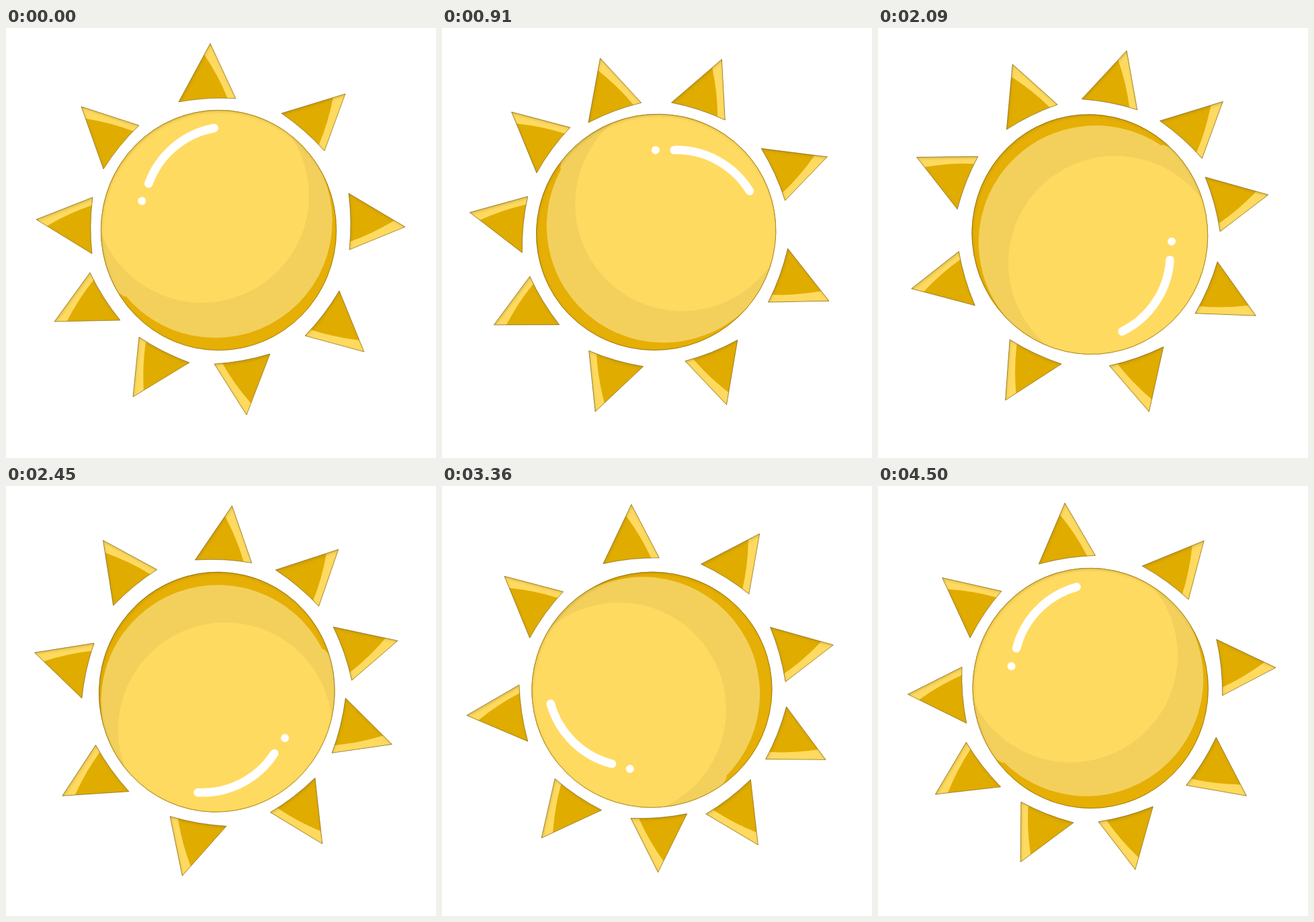
Recreate the animation shown at these times as an HTML page. Size 640 px wide and 640 px high, loop 4550 ms.

```html
<!DOCTYPE html>
<html lang="en">
<head>
<meta charset="utf-8">
<title>Spinning sun</title>
<style>
  html, body { margin: 0; width: 100%; height: 100%; overflow: hidden; background: #fff; }
  svg { display: block; width: 100%; height: 100%; }
  .base { fill: #e1ac00; }
  .bevel, .bright { fill: #ffda60; }
  .mid { fill: #f3d05c; }
  .dark { fill: #e6af05; }
  .rim { fill: none; stroke: #5e4a08; stroke-width: .8; stroke-opacity: .6; }
  .shine { fill: none; stroke: #fff; stroke-width: 12.5; stroke-linecap: round; }
</style>
</head>
<body>
<svg viewBox="0 0 640 640">
  <defs>
    <clipPath id="disc"><ellipse cx="316.5" cy="301" rx="175.5" ry="179"/></clipPath>
    <!-- soft inner shade along upper edges, independent of the spin -->
    <filter id="shade" filterUnits="userSpaceOnUse" x="0" y="0" width="640" height="640" color-interpolation-filters="sRGB">
      <feGaussianBlur in="SourceAlpha" stdDeviation="2"/>
      <feOffset dx="0.5" dy="1.5" result="soft"/>
      <feFlood flood-color="#7a5c00" flood-opacity=".3"/>
      <feComposite in2="soft" operator="out"/>
      <feComposite in2="SourceAlpha" operator="in" result="inner"/>
      <feMerge><feMergeNode in="SourceGraphic"/><feMergeNode in="inner"/></feMerge>
    </filter>
  </defs>
  <g filter="url(#shade)">
    <g id="sun">
      <g id="rays"></g>
      <g clip-path="url(#disc)">
        <rect class="dark" x="130" y="110" width="380" height="380"/>
        <circle class="mid" cx="311.6" cy="287.1" r="174.1"/>
        <path class="mid" d="M184 399 L176 399.5 L167 394 L130 394 L130 290 L170 290Z"/>
        <circle class="bright" cx="291.5" cy="249.5" r="159.5"/>
      </g>
      <ellipse class="rim" cx="316.5" cy="301" rx="175.2" ry="178.7"/>
      <path class="shine" d="M212.3 231.7 A128 128 0 0 1 309.8 149"/>
      <circle cx="202.3" cy="257.6" r="6" fill="#fff"/>
    </g>
  </g>
</svg>
<script>
  // each ray: tip, lit base corner, other base corner
  const RAYS = [
    [[304, 23], [342, 105], [257, 110]],
    [[505, 98], [474, 183], [410, 127]],
    [[594, 296], [511, 330], [510, 246]],
    [[533, 482], [445, 458], [496, 391]],
    [[358, 576], [310, 500], [393, 485]],
    [[189, 549], [198, 460], [273, 498]],
    [[72, 437], [125, 364], [170, 435]],
    [[45, 285], [129, 252], [128, 336]],
    [[112, 117], [198, 145], [145, 210]]
  ];
  const PIVOT = '315.5 304';
  const LOOP = 4550, FPS = 22, POSES = 136, POSE_FPS = 30;

  const mix = (p, q, k) => p.map((v, i) => v + (q[i] - v) * k);

  function ray([tip, lit, far]) {
    const bow = mix(mix(lit, far, .5), tip, .06);
    const top = mix(tip, far, .19);
    const foot = mix(mix(lit, far, .14), tip, .015);
    const bend = mix(top, foot, .5).map((v, i) => v + (lit[i] - far[i]) * .05);
    const body = `M${tip} L${lit} Q${bow} ${far}Z`;
    return `<path class="base" d="${body}"/>` +
      `<path class="bevel" d="M${tip} L${lit} L${foot} Q${bend} ${top}Z"/>` +
      `<path class="rim" d="${body}"/>`;
  }

  document.getElementById('rays').innerHTML = RAYS.map(ray).join('');
  const sun = document.getElementById('sun');
  const start = performance.now();

  // 30 poses per second shown at 22 steps per second, so the spin is slightly uneven
  function draw() {
    const ticks = Math.floor(((performance.now() - start) % LOOP) / 10);
    const step = Math.floor((ticks + .5) * FPS / 100);
    const pose = Math.max(0, Math.floor(step * POSE_FPS / FPS - .3));
    sun.setAttribute('transform', `rotate(${pose * 360 / POSES} ${PIVOT})`);
    requestAnimationFrame(draw);
  }
  draw();
</script>
</body>
</html>
```
